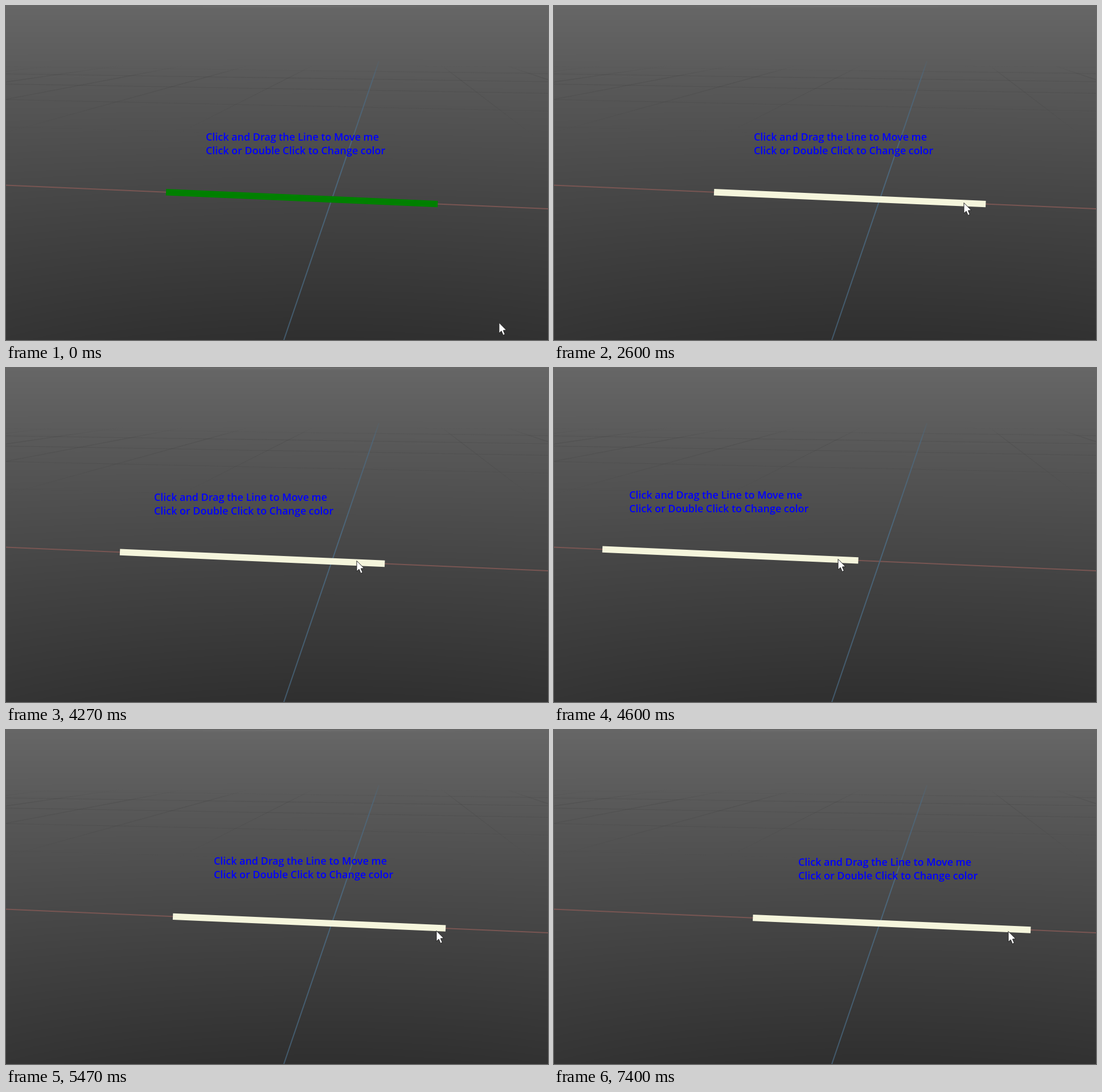
Animation, 952 px wide and 588 px high, one loop 8 s. Source, as an HTML page with a canvas:

```html
<!DOCTYPE html>
<html lang="en">
<head>
<meta charset="utf-8">
<title>Draggable line</title>
<style>
  html, body { margin: 0; width: 100%; height: 100%; overflow: hidden; background: #444; }
  canvas { display: block; width: 952px; height: 588px; }
</style>
</head>
<body>
<canvas id="stage" width="952" height="588"></canvas>
<script>
const W = 952, H = 588, LOOP = 8000, TICKS_PER_MS = 15 / 1000;
const ctx = document.getElementById('stage').getContext('2d');

// Pointer strokes, in ticks; a higher power brakes harder
const HOME = { x: 866, y: 557 };
const DRAG_START = 58;
const STROKES = [
  { from: 0, to: 5, x: 743, y: 365, power: 1.4 },
  { from: 6, to: 11, x: 720, y: 346, power: 1.2 },
  { from: DRAG_START, to: 64, x: 616, y: 339, power: 1.2 },
  { from: 64, to: 68, x: 499, y: 336, power: 1.2 },
  { from: 73, to: 78, x: 641, y: 349, power: 1.2 },
  { from: 78, to: 86, x: 798, y: 354, power: 1.9 }
];
const CLICKS = [39, 99, 111];

const clamp = v => Math.min(1, Math.max(0, v));
const axisY = x => 315.5 + 0.0436 * x;

function pointerAt(tick) {
  let { x, y } = HOME;
  for (const s of STROKES) {
    const f = 1 - (1 - clamp((tick - s.from) / (s.to - s.from))) ** s.power;
    x += (s.x - x) * f;
    y += (s.y - y) * f;
  }
  return { x, y };
}

function line(c, x1, y1, x2, y2, style, width) {
  c.strokeStyle = style;
  c.lineWidth = width;
  c.beginPath();
  c.moveTo(x1, y1);
  c.lineTo(x2, y2);
  c.stroke();
}

function vertical(c, top, bottom, stops) {
  const g = c.createLinearGradient(0, top, 0, bottom);
  stops.forEach(([p, color]) => g.addColorStop(p, color));
  return g;
}

// Brightness falls toward the bottom, in bands that arch around x = 560
function shade(x, y) {
  const bend = 1.9e-4 * (x - 560) ** 2 * (y / H) ** 2;
  const v = (y - bend) / H;
  const glow = Math.max(0, 3 - y) * 3 * Math.exp(-(((x - 510) / 230) ** 2));
  return Math.round(102 - 55 * v - 1.5 * Math.sin(Math.PI * v) + glow);
}

function drawBackdrop(c) {
  const img = c.createImageData(W, H);
  for (let y = 0, p = 0; y < H; y++) {
    for (let x = 0; x < W; x++, p += 4) {
      img.data.fill(shade(x, y), p, p + 3);
      img.data[p + 3] = 255;
    }
  }
  c.putImageData(img, 0, 0);
}

// Floor grid in perspective, with one vanishing point per direction
function drawGrid(c) {
  const ink = a => `rgba(64,64,64,${a})`;
  const haze = vertical(c, 104, 230, [[0, ink(0)], [0.18, ink(0.28)], [0.6, ink(0.2)], [1, ink(0)]]);
  for (let n = 1; n <= 6; n++) {
    const mid = 36 + 1 / (0.00329 + 0.0019 * n);
    const slope = (mid - 20) / 7350;
    line(c, 0, mid - 572 * slope, W, mid + (W - 572) * slope, haze, 1.4);
  }
  for (let m = -5; m <= 3; m++) {
    if (m === 0) continue;
    const slope = (138 * m - 28) / 84;
    line(c, 675 + 64 * slope, 100, 675 + 200 * slope, 236, haze, 1.4);
  }
}

function drawAxes(c) {
  line(c, 0, axisY(0), W, axisY(W), '#795653', 2);
  line(c, 655, 97, 488, 588, vertical(c, 97, 588, [
    [0, 'rgba(78,104,124,.2)'], [0.06, 'rgba(78,104,124,.75)'], [0.4, '#4c667a'], [1, '#42596b']
  ]), 2);
}

function makeScene() {
  const scene = document.createElement('canvas');
  scene.width = W;
  scene.height = H;
  const c = scene.getContext('2d');
  drawBackdrop(c);
  drawGrid(c);
  drawAxes(c);
  return scene;
}

const scene = makeScene();
const arrow = new Path2D('M0 0V18.5L4.2 14.8L7.2 22L10.4 20.6L7.4 13.6L13 13.2Z');

function drawPointer({ x, y }) {
  ctx.save();
  ctx.translate(Math.round(x), Math.round(y) + 0.5);
  ctx.fillStyle = '#fff';
  ctx.fill(arrow);
  ctx.strokeStyle = '#222';
  ctx.lineWidth = 1;
  ctx.stroke(arrow);
  ctx.restore();
}

// Ticks start at times rounded to 10 ms
function tickAt(t) {
  const k = Math.round(t * TICKS_PER_MS);
  return Math.round(k / TICKS_PER_MS / 10) * 10 > t ? k - 1 : k;
}

function drawBar(shift, color) {
  const left = 85 + 0.885 * shift - 0.00004 * shift * shift;
  const right = 534.5 + shift;
  line(ctx, left, axisY(left), right, axisY(right), color, 11.3);
}

function drawLabel(shift) {
  const x = Math.round(132 + 0.98 * shift), y = Math.round(230 + 0.031 * shift);
  ctx.font = '600 17.9px "Open Sans", "Noto Sans", sans-serif';
  ctx.fillStyle = '#00f';
  ctx.fillText('Click and Drag the Line to Move me', x, y);
  ctx.fillText('Click or Double Click to Change color', x, y + 24);
}

function draw(t) {
  const tick = tickAt(t);
  ctx.drawImage(scene, 0, 0);

  // The bar follows the pointer one tick late
  const grip = pointerAt(Math.max(DRAG_START, tick - 1)).x;
  const shift = (grip - 499) * 1.0127;
  const clicks = CLICKS.filter(k => k <= tick).length;
  drawBar(shift, clicks % 2 ? '#f5f5dc' : '#008000');
  drawLabel(shift);
  drawPointer(pointerAt(tick));
}

const start = performance.now();
function loop() {
  draw((performance.now() - start) % LOOP);
  requestAnimationFrame(loop);
}
loop();
</script>
</body>
</html>
```
